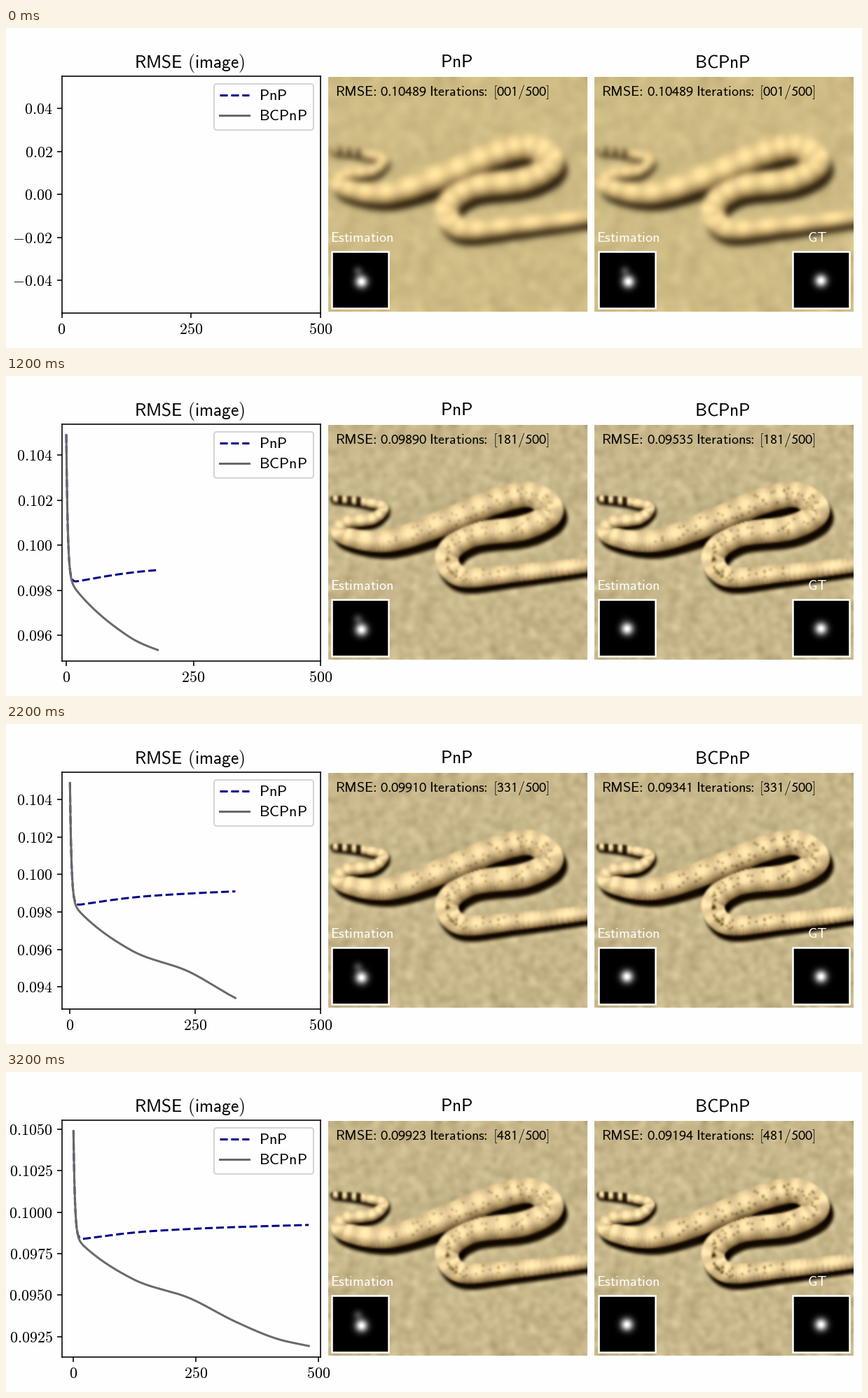
These frames come from a looping animation (1222 px wide and 458 px high, 3.4 s). A matplotlib script:

```python
import matplotlib.pyplot as plt
import numpy as np
from matplotlib.animation import FuncAnimation
from matplotlib.patches import FancyBboxPatch, Rectangle

W, H, DPI = 1222, 458, 128
PX = 72 / DPI            # points per pixel
FRAMES, STEP = 17, 30
PANEL_W, PANEL_H = 369.5, 336
BLUE, GRAY, PAPER = "#00008b", "#696969", "#fefefe"

plt.rcParams["mathtext.fontset"] = "cm"
rng = np.random.default_rng(4)


def smooth(t, ts, vs):
    """Cubic Hermite curve through the points (ts, vs)."""
    ts, vs = np.asarray(ts, float), np.asarray(vs, float)
    m = np.gradient(vs, ts)
    i = np.clip(np.searchsorted(ts, t, "right") - 1, 0, len(ts) - 2)
    h = ts[i + 1] - ts[i]
    s = (t - ts[i]) / h
    return ((1 + 2 * s) * (1 - s) ** 2 * vs[i] + s * (1 - s) ** 2 * h * m[i]
            + s * s * (3 - 2 * s) * vs[i + 1] + s * s * (s - 1) * h * m[i + 1])


# error curves: a slow trend plus a fast initial drop
START = 0.10489
KEYS = [0, 30, 120, 240, 330, 420, 480]
n = np.arange(STEP * (FRAMES - 1) + 1)


def error_curve(trend):
    return smooth(n, KEYS, trend) + (START - trend[0]) * np.exp(-n / 3)


pnp = error_curve([.09830, .09843, .09876, .09899, .09910, .09918, .09923])
bcpnp = error_curve([.09855, .09773, .09599, .09478, .09341, .09233, .09194])

# picture, computed on a grid of 2 px cells
GW, GH = 185, 168
gy, gx = np.mgrid[0:GH, 0:GW] * 2.0 + 1

BODY = [(8, 106), (48, 110), (78, 118), (64, 134), (24, 140), (22, 158), (85, 166),
        (170, 138), (240, 109), (290, 100), (318, 124), (280, 147), (205, 158),
        (170, 186), (190, 217), (270, 212), (390, 198)]
SAND, LIGHT, DARK, SHADE = np.array([(198, 182, 138), (243, 217, 163),
                                     (84, 60, 25), (36, 26, 10)], float)

knots = np.arange(len(BODY))
arc = np.linspace(0, knots[-1], 240)
path_x, path_y = (smooth(arc, knots, c) for c in zip(*BODY))
radius = np.interp(arc, [0, 4, 7, 13, 16], [5, 10, 19, 17, 11])


def stroke(shift_x=0, shift_y=0):
    """Coverage, lit-to-dark offset and path position of the body, shifted in radii."""
    best = np.full((GH, GW), np.inf)
    cover, side, along = np.zeros((3, GH, GW))
    for t, cx, cy, r in zip(arc, path_x, path_y, radius):
        dx, dy = gx - cx - shift_x * r, gy - cy - shift_y * r
        q = np.hypot(dx, dy) / r
        near = q < best
        best[near] = q[near]
        cover[near] = np.clip((1 - q) * r / 2 + 0.5, 0, 1)[near]
        side[near] = ((0.9 * dy + 0.35 * dx) / r)[near]
        along[near] = t
    return cover, side, along


def blur(a, s):
    r = int(3 * s) + 1
    k = np.exp(-0.5 * (np.arange(-r, r + 1) / s) ** 2)
    k /= k.sum()
    for axis in (0, 1):
        pad = [(0, 0)] * a.ndim
        pad[axis] = (r, r)
        p, size = np.pad(a, pad, mode="edge"), a.shape[axis]
        a = sum(w * np.take(p, range(i, i + size), axis=axis) for i, w in enumerate(k))
    return a


def mix(base, colour, cover):
    return base + (colour - base) * cover[..., None]


def make_scene():
    grain = blur(rng.normal(size=(GH, GW)), 1.8)
    scene = SAND + 5 * (grain / grain.std())[..., None]
    scene = mix(scene, SHADE, blur(stroke(0.3, 0.6)[0], 1))
    cover, side, along = stroke()
    depth = np.clip((side + 0.1) / 1.2, 0, 1) ** 1.4 + 0.3 * np.clip(-side - 0.4, 0, 1)
    skin = mix(LIGHT, DARK, depth)
    skin = skin * (1 + 0.06 * np.sin(15 * along))[..., None]
    bands = np.clip(0.5 + 1.2 * np.sin(gx * 0.47), 0, 1) * (along < 1.1)
    return mix(scene, mix(skin, SHADE, 0.85 * bands), cover)


def make_spots(count=130):
    spots = np.zeros((GH, GW))
    for i in rng.integers(90, 225, count):
        x = int(path_x[i] / 2)
        y = int((path_y[i] + rng.uniform(-0.7, 0.5) * radius[i]) / 2)
        if 0 <= x < GW and 0 <= y < GH:
            spots[y, x] = 1
    return blur(spots, 0.8)


def sharpen(a, s, amount):
    return a + amount * (a - blur(a, s))


scene = make_scene()
blurred = blur(scene, 2.0) * [1.04, 1.03, 0.96]
soft = sharpen(blur(scene, 0.95), 4, 0.35)
crisp = sharpen(blur(scene, 0.6), 3, 0.4) - 220 * make_spots()[..., None]


def picture(f, detail):
    if f == 0:
        img = blurred
    else:
        img = soft + (crisp - soft) * detail * (1 - np.exp(-f / 4))
    return np.clip(img, 0, 255) / 255


# blur kernels
ky, kx = np.mgrid[-40:41, -40:41]


def blob(x, y, s):
    return np.exp(-((kx - x) ** 2 + (ky - y) ** 2) / (2 * s * s))


def kernel(bias):
    k = blob(2 * bias, 1 + 1.5 * bias, 6.3) + bias * 0.25 * blob(-3, -13, 4.8)
    return k / k.max()


# stage
fig = plt.figure(figsize=(W / DPI, H / DPI), dpi=DPI, facecolor=PAPER)
stage = fig.add_axes([0, 0, 1, 1])
stage.set(xlim=(0, W), ylim=(H, 0))
stage.axis("off")


def sans(s):
    s = s.replace(":", r"\hspace{-0.2}:\hspace{-0.2}").replace(" ", r"\hspace{0.38}")
    return rf"$\mathsf{{{s}}}$"


def sans_digits(s):
    """Numbers set in the sans-serif mathematical digits."""
    s = "".join(chr(0x1D7E2 + int(c)) if c.isdigit() else c for c in s)
    return rf"$\mathrm{{{s}}}$"


def label(x, y, s, size=20, color="black", ha="left"):
    return stage.text(x, y, sans(s) if s else "", fontsize=size * PX, color=color,
                      ha=ha, va="baseline", zorder=5)


def image(x, y, w, h, data, **kw):
    return stage.imshow(data, extent=(x, x + w, y + h, y), aspect="auto",
                        interpolation="bilinear", **kw)


def inset(x, data, y=319.7, size=81):
    im = image(x, y, size, size, data, cmap="gray", vmin=0, vmax=1, zorder=3)
    stage.add_patch(Rectangle((x, y), size, size, fill=False, ec="white",
                              lw=2.5 * PX, zorder=4))
    return im


class Panel:
    def __init__(self, x, title, curve, detail):
        self.curve, self.detail = curve, detail
        self.im = image(x, 70, PANEL_W, PANEL_H, picture(0, detail), zorder=1)
        label(x + PANEL_W / 2 - 1.7, 56.5, title, 25.6, ha="center")
        label(x + 3, 306, "Estimation", color="white")
        label(x + 9.5, 97, "RMSE:")
        label(x + 144.5, 97, "Iterations:")
        self.error = label(x + 74.3, 97, "")
        self.count = label(x + 235, 97, "")
        self.kernel = inset(x + 5.4, kernel(1))

    def update(self, f, bias):
        i = STEP * f
        self.im.set_data(picture(f, self.detail))
        self.kernel.set_data(kernel(bias))
        self.error.set_text(sans_digits(f"{self.curve[i]:.5f}"))
        self.count.set_text(sans_digits(f"[{i + 1:03d}/500]"))


left = Panel(460, "PnP", pnp, 0.75)
right = Panel(840.3, "BCPnP", bcpnp, 1.05)
inset(1123.4, kernel(0))
label(1157.7, 306, "GT", color="white", ha="center")
label(262.3, 56.5, "RMSE (image)", 25.4, ha="center")

# legend
stage.add_patch(FancyBboxPatch((301, 84), 134, 58, boxstyle="round,pad=4,rounding_size=4",
                               fc=PAPER, ec="#d4d4d4", lw=2 * PX))
for y, name, color, style in [(96, "PnP", BLUE, "--"), (125, "BCPnP", GRAY, "-")]:
    stage.plot([305, 347], [y, y], style, color=color, lw=3 * PX)
    label(361.3, y + 7.2, name, 22)

# error plot
ax = fig.add_axes([79.5 / W, 1 - 407.5 / H, 369.5 / W, 338.5 / H])
ax.patch.set_visible(False)
for spine in ax.spines.values():
    spine.set_linewidth(1.6 * PX)
ax.tick_params(length=7 * PX, width=1.6 * PX, pad=6 * PX, labelsize=22 * PX)
ax.tick_params(axis="x", pad=8 * PX)
pnp_line, = ax.plot([], [], "--", color=BLUE, lw=3 * PX)
bc_line, = ax.plot([], [], color=GRAY, lw=3 * PX)
ax.set_xticks([0, 250, 500], ["$0$", "$250$", "$500$"])


def set_y(f, low):
    pad = 0.05 * (START - low)
    if f == 0:
        lo, hi, step, digits = -0.055, 0.055, 0.02, 2
    else:
        lo, hi = low - pad, START + pad
        step, digits = (0.002, 3) if (hi - lo) / 7 <= 0.002 else (0.0025, 4)
    ticks = np.arange(np.ceil(lo / step), np.floor(hi / step) + 1) * step
    ax.set_yticks(ticks, [f"${v + 0.0:.{digits}f}$" for v in ticks])
    ax.set_ylim(lo, hi)


def update(f):
    last = STEP * f
    pnp_line.set_data(n[:last + 1], pnp[:last + 1])
    bc_line.set_data(n[:last + 1], bcpnp[:last + 1])
    ax.set_xlim(-0.05 * last, max(500, 1.05 * last))
    set_y(f, bcpnp[last])
    left.update(f, 1)
    right.update(f, np.exp(-(last / 125) ** 2))
    return []


anim = FuncAnimation(fig, update, frames=FRAMES, interval=200, repeat=True, repeat_delay=0)
plt.show()
```
